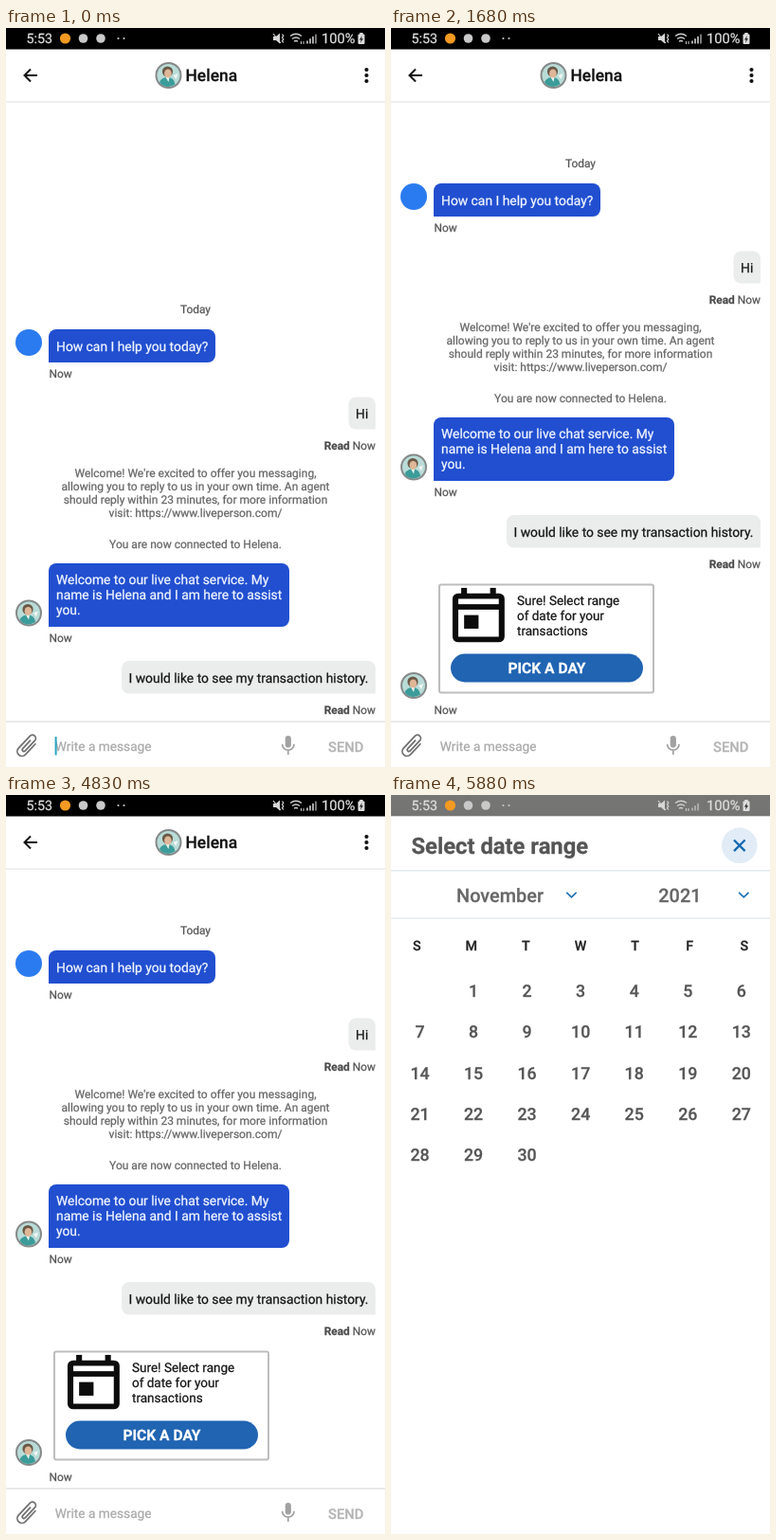
Recreate the animation shown at these times as an HTML page. Size 400 by 780 pixels, loop 8000 ms.

```html
<!DOCTYPE html>
<html lang="en">
<head>
<meta charset="utf-8">
<title>Chat date picker</title>
<style>
  html, body { margin: 0; width: 100%; height: 100%; overflow: hidden; background: #fff; }
  svg { display: block; width: 400px; height: 780px; }
  text { font-family: Roboto, "Noto Sans", sans-serif; text-rendering: geometricPrecision; white-space: pre; }
  #dim { mix-blend-mode: multiply; }
</style>
</head>
<body>
<svg id="stage" viewBox="0 0 400 780"></svg>
<script>
const LOOP = 8000, STEP = 70, SCROLL = 154;
const BLUE = '#214fd0', GREY = '#555', INK = '#0c0c0c';

// A hairline stroke gives the slightly heavy look of phone text.
const text = (x, y, str, size, fill, extra = '') =>
  `<text x="${x}" y="${y}" font-size="${size}" fill="${fill}" stroke="${fill}" stroke-width=".25" ${extra}>${str}</text>`;
const mid = (x, y, str, size, fill, weight = 400) =>
  text(x, y, str, size, fill, `text-anchor="middle" font-weight="${weight}"`);
const rect = (x, y, w, h, fill, extra = '') =>
  `<rect x="${x}" y="${y}" width="${w}" height="${h}" fill="${fill}" ${extra}/>`;
const circle = (x, y, r, fill, extra = '') =>
  `<circle cx="${x}" cy="${y}" r="${r}" fill="${fill}" ${extra}/>`;
const line = (d, color, width, extra = '') =>
  `<path d="${d}" fill="none" stroke="${color}" stroke-width="${width}" ${extra}/>`;

// Rounded box with one square bottom corner on the speaker's side.
const bubble = (x, y, w, h, fill, squareLeft) => {
  const r = 8, left = squareLeft ? 0 : r, right = squareLeft ? r : 1.5;
  return `<path fill="${fill}" d="M${x + r} ${y}h${w - 2 * r}a${r} ${r} 0 0 1 ${r} ${r}v${h - r - right}
    a${right} ${right} 0 0 1 ${-right} ${right}h${-(w - right - left)}
    a${left} ${left} 0 0 1 ${-left} ${-left}v${-(h - r - left)}a${r} ${r} 0 0 1 ${r} ${-r}z"/>`;
};

const avatar = (x, y) => `<g transform="translate(${x} ${y})">
  ${circle(0, 0, 13, '#b9dcd8', 'stroke="#858989" stroke-width="2"')}
  <path d="M-9.5 7Q-7 2 -1 2Q6 2 7 9.5Q0 14 -7 10z" fill="#3b9c9a"/>
  <path d="M-3 2h4l-1 5z" fill="#eef4f1"/>
  ${circle(-1, -4, 5.6, '#6b5947')}
  <ellipse cx="-.6" cy="-2" rx="3.8" ry="4.6" fill="#dfb798"/>
  <path d="M5 0l5 -2l-2 6z" fill="#f3f6f4"/>
</g>`;

const now = y => text(45.5, y, 'Now', 11.9, GREY);
const readNow = y =>
  text(390, y, '<tspan font-weight="700" fill="#4a4a4a">Read</tspan> Now', 11.9, GREY, 'text-anchor="end"');

const lines = (x, y, gap, rows, size, fill, extra) =>
  rows.map((row, i) => text(x, y + i * gap, row, size, fill, extra)).join('');

const messages = `
  ${circle(24, 178, 14, '#2b7bf0')}
  ${bubble(45, 164, 176, 35, BLUE, true)}
  ${text(53, 186.7, 'How can I help you today?', 13.85, '#f4f7ff')}
  ${now(215.3)}
  ${bubble(361.5, 235.5, 28.5, 34, '#ebecec', false)}
  ${text(369, 257.5, 'Hi', 13.85, '#151515')}
  ${readNow(291.3)}
  ${lines(200, 319.7, 14.2, [
    "Welcome! We're excited to offer you messaging,",
    'allowing you to reply to us in your own time. An agent',
    'should reply within 23 minutes, for more information',
    'visit: https://www.liveperson.com/'], 12.02, '#666', 'text-anchor="middle"')}
  ${mid(200, 395, 'You are now connected to Helena.', 12, '#666')}
  ${avatar(24, 463.5)}
  ${bubble(45, 411, 254, 67, BLUE, true)}
  ${lines(53, 433, 16.2, [
    'Welcome to our live chat service. My',
    'name is Helena and I am here to assist',
    'you.'], 13.85, '#f4f7ff')}
  ${now(494.3)}
  ${bubble(122, 514, 268, 34.5, '#ebecec', false)}
  ${text(129.5, 536.5, 'I would like to see my transaction history.', 13.85, '#151515')}
  ${readNow(570.3)}`;

// Drawn on a 24-unit icon grid.
const calendar = `<g transform="translate(55.8 585.2) scale(3.05 2.87)">
  ${rect(4, 5, 16, 16, '#fff', `rx="1" stroke="${INK}" stroke-width="2"`)}
  ${rect(4, 8, 16, 2, INK)}${rect(6, 2, 2, 3, INK)}${rect(16, 2, 2, 3, INK)}${rect(7, 12, 5, 5, INK)}
</g>`;

const card = `
  ${rect(51, 587.5, 226, 114, '#fff', 'rx="2" stroke="#bcbdbd" stroke-width="2"')}
  ${calendar}
  ${lines(133, 609, 16, ['Sure! Select range', 'of date for your', 'transactions'], 13.5, '#151515')}
  ${rect(63, 660.5, 203, 30, '#2064b2', 'rx="15"')}
  ${mid(164.5, 681.3, 'PICK A DAY', 15.6, '#fff', 700)}
  ${avatar(24, 694)}
  ${now(724.3)}`;

const header = `
  ${rect(0, 0, 400, 78, '#fff')}
  ${rect(0, -2, 400, 24.5, '#000')}
  ${rect(0, 77.5, 400, 1, '#dfe0e0')}
  ${line('M33 50H19.5M26 43.5L19.5 50L26 56.5', '#111', 2)}
  ${avatar(171.5, 50)}
  ${text(189.5, 56.3, 'Helena', 17.4, '#111', 'font-weight="500"')}
  ${[44, 50, 56].map(y => circle(380.5, y, 2.1, '#111')).join('')}`;

const inputBar = `
  ${rect(0, 732, 400, 50, '#fff')}
  ${rect(0, 731.5, 400, 1.2, '#dadada')}
  <g transform="translate(22.5 757.5) rotate(43) scale(1.1)">
    ${line('M4.5 -7V7.5A4.5 4.5 0 0 1 -4.5 7.5V-8.5A3.2 3.2 0 0 1 1.9 -8.5V5A1.5 1.5 0 0 1 -1.3 5V-6', '#707070', 1.6)}
  </g>
  ${text(51.8, 762.5, 'Write a message', 13.7, '#a9a9a9')}
  ${rect(294.7, 747, 6.2, 12.5, '#a2a2a2', 'rx="3.1"')}
  ${line('M291.6 756a6.2 6.2 0 0 0 12.4 0M297.8 762v5', '#a2a2a2', 1.7)}
  ${text(340, 763.5, 'SEND', 14.8, '#b4b4b4', 'font-weight="500"')}
  ${rect(51.6, 748, 2, 19.5, '#2aa5c0', 'id="caret"')}`;

const chevron = x => line(`M${x - 5.2} 102.8l5.2 5l5.2 -5`, '#1d72b3', 1.7);
const column = (i, first, gap) => first + i * gap;
const weekdays = [...'SMTWTFS'].map((d, i) => mid(column(i, 27.2, 57.6), 164.2, d, 14.3, '#222', 500)).join('');
const days = Array.from({ length: 30 }, (_, i) =>
  mid(column((i + 1) % 7, 30.5, 56.55), 213 + 43.35 * Math.floor((i + 1) / 7), i + 1, 17.8, GREY, 500)).join('');

const panel = `
  ${rect(0, 0, 400, 780, '#fff')}
  ${rect(0, -1, 400, 23.3, '#757573')}
  ${text(21.5, 62.2, 'Select date range', 23.75, GREY, 'font-weight="700"')}
  ${circle(367.8, 53.3, 18.8, '#e1ecf6')}
  ${line('M362 47.5l11.6 11.6M373.6 47.5l-11.6 11.6', '#1468b0', 2.3)}
  ${rect(0, 79, 400, 1.5, '#dfe9ee')}
  ${text(69, 113, 'November', 19.9, '#666', 'font-weight="500"')}${chevron(190.5)}
  ${text(282.3, 113, '2021', 19.9, '#666', 'font-weight="500"')}${chevron(372.3)}
  ${rect(0, 129.5, 400, 1.3, '#dfe9ee')}
  ${weekdays}${days}`;

const status = `
  ${text(21.5, 16.2, '5:53', 14.3, '#dedede')}
  ${circle(62.5, 11, 5.6, '#f39a22')}
  ${circle(81.5, 11, 4.8, '#c9c9c9')}${circle(100, 11, 4.8, '#c9c9c9')}
  ${circle(118.5, 11, 1.1, '#c9c9c9')}${circle(124.5, 11, 1.1, '#c9c9c9')}
  <path d="M282 9h3l4 -3.5v11l-4 -3.5h-3z" fill="#d6d6d6"/>
  ${line('M282 6l8 10M291.5 6.5l1.3 1.8l-1.3 1.8l1.3 1.8l-1.3 1.8l1.3 1.8', '#d6d6d6', 1.2)}
  ${line('M300 8.5q6 -4.5 12 0M302 11.5q4 -3 8 0M304 14.3q2 -1.5 4 0', '#d0d0d0', 1.4)}
  ${line('M311.5 14v3M314 14v3', '#d0d0d0', 1)}
  ${[0, 1, 2, 3].map(i => rect(317 + i * 3, 13.5 - i * 2.3, 2, 3 + i * 2.3, i < 3 ? '#a9a9a9' : '#777')).join('')}
  ${text(333, 16.2, '100%', 14.7, '#dedede')}
  ${rect(371.5, 6.5, 7, 10.5, '#dedede', 'rx="1"')}${rect(373.3, 5, 3.4, 2, '#dedede')}
  <path d="M375.8 8l-2.8 4.4h1.8l-.8 3.4l3 -4.6h-1.8z" fill="#222"/>`;

const stage = document.getElementById('stage');
stage.innerHTML = `
  <clipPath id="listArea"><rect y="78" width="400" height="654"/></clipPath>
  ${rect(0, 0, 400, 780, '#fff')}
  <g id="app">
    <g clip-path="url(#listArea)">
      <g id="today">${mid(200, 146.5, 'Today', 11.9, GREY)}</g>
      <g id="messages">${messages}</g>
      <g id="card">${card}</g>
    </g>
    ${header}${inputBar}
  </g>
  ${rect(0, 0, 400, 780, '#f6f9f8', 'id="dim"')}
  <g id="panel">${panel}</g>
  ${status}`;

const part = Object.fromEntries(
  ['app', 'today', 'messages', 'card', 'caret', 'dim', 'panel'].map(id => [id, document.getElementById(id)]));

const progress = (t, start, length) => Math.min(1, Math.max(0, (t - start) / length));
const moveY = (el, y) => el.setAttribute('transform', `translate(0 ${y.toFixed(2)})`);
const fade = (el, value) => el.setAttribute('opacity', value);

const caretToggles = [560, 1050, 1470, 1960, 2590, 3150, 3710, 4200, 4690];

function draw(time) {
  const t = Math.floor(time / STEP) * STEP;

  const scroll = (1 - Math.cos(Math.PI * progress(t, 233, 250))) / 2;
  moveY(part.messages, SCROLL * (1 - scroll));
  moveY(part.today, scroll > 0 ? 0 : SCROLL);
  fade(part.card, progress(t, 490, 120));
  fade(part.caret, caretToggles.filter(at => at <= t).length % 2 ? 0 : 1);

  const open = progress(t, 5427.7, 430);
  moveY(part.panel, 780 * (1 - open) ** 3);
  fade(part.panel, Math.min(1, open * 1.75));
  moveY(part.app, -1.5 * Math.min(1, open * 2.5));
  fade(part.dim, Math.min(1, open * 2.5));
}

const start = performance.now();
function tick() {
  draw((performance.now() - start) % LOOP);
  requestAnimationFrame(tick);
}
tick();
</script>
</body>
</html>
```
